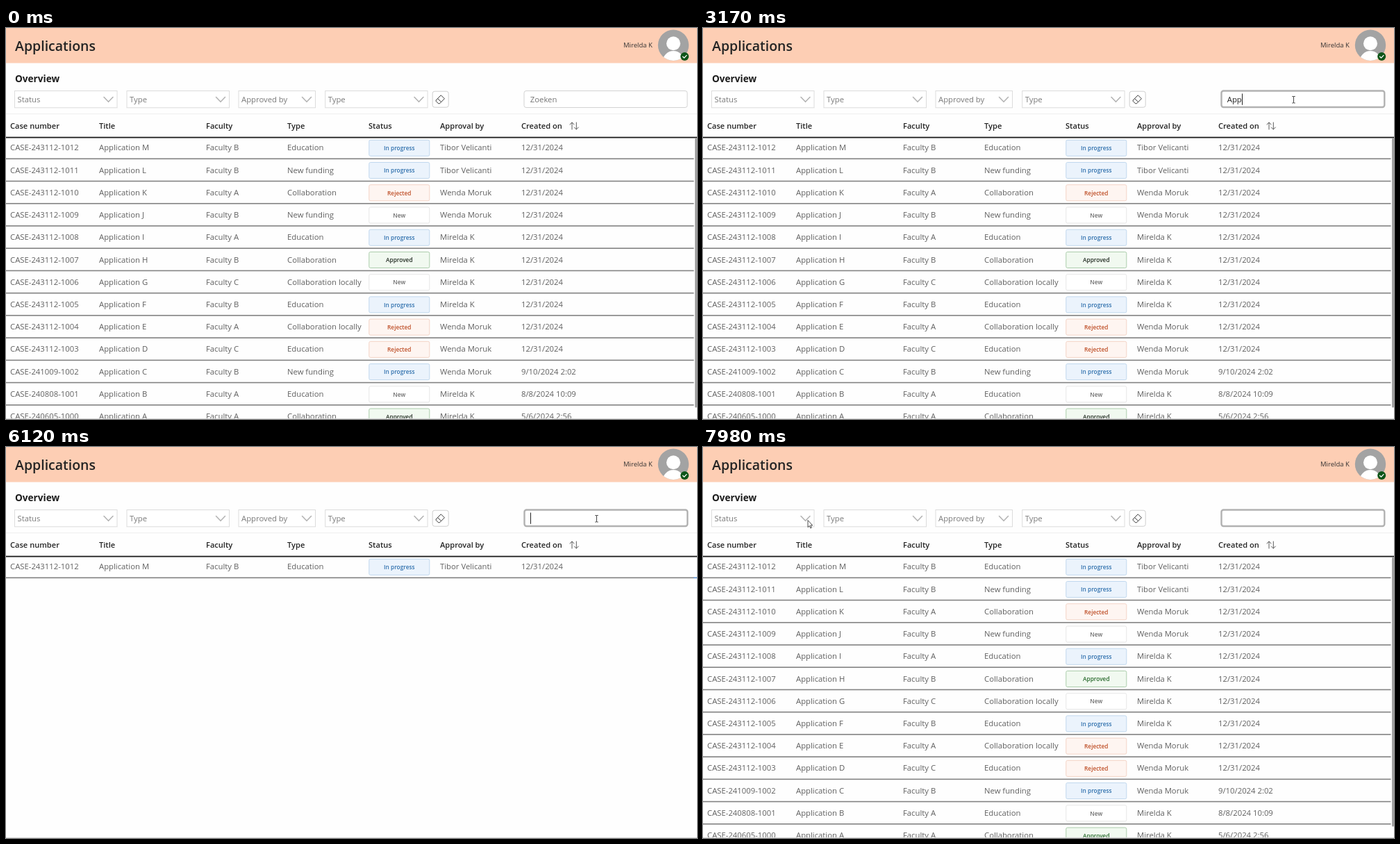
An HTML page for the animation above (8000 ms loop, 995 px wide and 563 px high).

```html
<!DOCTYPE html>
<html lang="en">
<head>
<meta charset="utf-8">
<title>Applications</title>
<style>
  html, body { margin: 0; width: 100%; height: 100%; overflow: hidden; background: #fefefe; }
  svg { display: block; width: 995px; height: 563px; }
  text { font: 11.3px "Open Sans", "Noto Sans", sans-serif; fill: #606060; white-space: pre; }
  .title { font-size: 19.5px; font-weight: 600; fill: #242424; }
  .overview { font-size: 13.6px; font-weight: 700; fill: #1c1c1c; }
  .head { font-size: 11.1px; font-weight: 600; fill: #242424; }
  .user { font-size: 9.5px; fill: #333; }
  .hint { fill: #7a7a7a; }
  .badge { font-size: 8.3px; font-weight: 600; text-anchor: middle; }
  .line { fill: none; stroke-linecap: round; stroke-linejoin: round; }
</style>
</head>
<body>
<svg id="stage" viewBox="0 0 995 563"></svg>
<script>
const LOOP = 8000, PHRASE = 'Application M', SEARCH_X = 754.8;
const ME = 'Mirelda K', TIBOR = 'Tibor Velicanti', WENDA = 'Wenda Moruk';
const COLUMNS = [[6, 'Case number'], [134, 'Title'], [288, 'Faculty'], [405, 'Type'],
  [522, 'Status'], [625, 'Approval by'], [742, 'Created on']];
const EDU = 'Education', FUND = 'New funding', COL = 'Collaboration', LOCAL = 'Collaboration locally';
const BADGES = { // background, border, text
  'In progress': ['#ebf3fc', '#c0d8ee', '#2f70ad'],
  Rejected: ['#fef5f1', '#f3d3c6', '#bf5029'],
  New: ['#ffffff', '#e6e6e6', '#6a6a6a'],
  Approved: ['#f1f9f0', '#abcdab', '#222c22']
};
const NEW_YEAR = '12/31/2024';
const ROWS = [
  ['243112', 'B', EDU, 'In progress', TIBOR],
  ['243112', 'B', FUND, 'In progress', TIBOR],
  ['243112', 'A', COL, 'Rejected', WENDA],
  ['243112', 'B', FUND, 'New', WENDA],
  ['243112', 'A', EDU, 'In progress', ME],
  ['243112', 'B', COL, 'Approved', ME],
  ['243112', 'C', LOCAL, 'New', ME],
  ['243112', 'B', EDU, 'In progress', ME],
  ['243112', 'A', LOCAL, 'Rejected', WENDA],
  ['243112', 'C', EDU, 'Rejected', WENDA],
  ['241009', 'B', FUND, 'In progress', WENDA, '9/10/2024 2:02'],
  ['240808', 'A', EDU, 'New', ME, '8/8/2024 10:09'],
  ['240605', 'A', COL, 'Approved', ME, '5/6/2024 2:56']
];

const text = (x, y, s, cls = '') => `<text x="${x}" y="${y}" class="${cls}">${s}</text>`;
const rect = (x, y, w, h, fill, more = '') =>
  `<rect x="${x}" y="${y}" width="${w}" height="${h}" fill="${fill}" ${more}/>`;
const line = (d, color, width) =>
  `<path class="line" d="${d}" stroke="${color}" stroke-width="${width}"/>`;

function badge(y, status) {
  const [bg, border, ink] = BADGES[status];
  return rect(522.8, y - 11.1, 87, 23, bg, `rx="2" stroke="${border}"`) +
    `<text class="badge ${status}" x="566.3" y="${y + 3.7}" style="fill:${ink}">${status}</text>`;
}

function row([code, faculty, type, status, by, date = NEW_YEAR], i) {
  const y = 172.4 + 32.23 * i;
  const cells = [`CASE-${code}-${1012 - i}`, 'Application ' + 'MLKJIHGFEDCBA'[i],
    'Faculty ' + faculty, type, , by, date];
  return cells.map((s, c) => text(COLUMNS[c][0], y + 4, s)).join('') + badge(y, status) +
    rect(0, y + 15.1, 990.5, 1.6, '#828282');
}

function select(x, w, label) {
  const c = x + w - 12.5;
  return rect(x, 90.5, w, 24.3, '#fff', 'stroke="#dcdcdc"') + text(x + 4, 107.4, label, 'hint') +
    line(`M${c - 6.5} 99.5l6.5 6.8 6.5-6.8`, '#b4b4b4', 1.6);
}

const rows = ROWS.map(row);
document.getElementById('stage').innerHTML = `
  <clipPath id="page"><rect y="158" width="995" height="404"/></clipPath>
  <clipPath id="face"><circle cx="961" cy="24.7" r="22.2"/></clipPath>
  ${rect(0, 0, 995, 563, '#fefefe')}
  ${rect(0, 0, 995, 50.5, '#fdceb4')}
  ${text(13, 32.6, 'Applications', 'title')}
  ${text(889, 28.3, ME, 'user')}
  <g clip-path="url(#face)">
    ${rect(938, 2, 46, 46, '#a3a3a3')}
    <g fill="#fff"><circle cx="961" cy="22.2" r="10"/><ellipse cx="961" cy="48" rx="15.2" ry="15"/></g>
  </g>
  <circle cx="977.2" cy="41" r="6" fill="#0d5518"/>
  ${line('M974.6 41.2l1.9 1.9 3.5-3.7', '#fff', 1.3)}
  ${text(13, 78, 'Overview', 'overview')}
  ${select(12.5, 147.5, 'Status')}${select(174, 147.5, 'Type')}
  ${select(335, 110.5, 'Approved by')}${select(459.7, 147.3, 'Type')}
  ${rect(614.2, 91.2, 23, 23, '#fff', 'rx="3" stroke="#cfcfcf"')}
  ${line('M626.6 97l4.8 4.8-7 7h-1.8l-3.4-3.4v-1zM621.8 101.8l4.9 4.8', '#383838', 1)}
  <rect id="field" y="90.5" fill="#fff" rx="3"/>
  <rect id="mark" x="755" y="94" height="17" fill="#0078d7"/>
  <text id="query" x="${SEARCH_X}" y="107.4"><tspan></tspan><tspan></tspan></text>
  <rect id="caret" y="94.5" width="1" height="16.3" fill="#222"/>
  ${rect(0, 123.2, 995, 1, '#eeeeee')}
  ${COLUMNS.map(([x, s]) => text(x, 145, s, 'head')).join('')}
  ${line('M815 146v-10m-3 3l3-3 3 3M821.3 136v10m-3-3l3 3 3-3', '#5a5a5a', 1)}
  ${rect(0, 156.7, 995, 1.8, '#1c1c1c')}
  <g clip-path="url(#page)">
    ${rows[0]}
    <g id="rest">${rows.slice(1).join('')}${rect(992, 159, 3, 387.5, '#a2a2a2', 'rx="1"')}</g>
    <g id="single">${rect(990, 187.5, 5, 1.6, '#5b8fd0')}</g>
  </g>
  ${rect(0, 562, 995, 1, '#dedede')}
  <g id="beam">${line('M-1.8-4.5h1.4l.4.4.4-.4h1.4M0-4v8.5M-1.8 5h1.4l.4-.4.4.4h1.4', '#333', .9)}</g>
  <path id="arrow" d="M0 0v10l2.3-2 1.5 3.4 1.5-.7-1.5-3.3h3z" fill="#fff" stroke="#222" stroke-width=".8"/>`;

const $ = id => document.getElementById(id);
const [typed, tail] = $('query').children;
const show = (el, on) => { el.style.display = on ? '' : 'none'; };
const set = (el, attrs) => { for (const k in attrs) el.setAttribute(k, attrs[k]); };
const within = (t, spans) => spans.some(([a, b]) => t >= a && t < b);

function typedCount(t) {
  if (t < 2700 || t >= 6120) return 0;
  if (t >= 4300) return 13;
  if (t >= 3370) return Math.min(12, 4 + Math.floor((t - 3370) / 91.25));
  return t < 3040 ? 1 : t < 3170 ? 2 : 3;
}

// Pointer kind and position
function pointer(t) {
  if (t < 1050) return [];
  if (t < 1110) return ['arrow', 911, 137];
  if (t < 1250) return ['arrow', 848, 121];
  if (t < 1450) return ['beam', 850.5, 112 - 3 * Math.floor((t - 1250) / 67)];
  if (t < 7200) return ['beam', 850.5, 103];
  const p = Math.min(1, (Math.floor((t - 7200) / 65) + 1) / 12);
  const e = p * p * (3 - 2 * p);
  return [p < .1 ? 'beam' : 'arrow', 850.5 - 699.5 * e, 103 + 2.5 * e + 4 * 67 * e * (1 - e)];
}

function draw(t) {
  const focus = t >= 1710, selected = t >= 5790 && t < 6120;
  const filtered = t >= 4300 && t < 6380;
  set($('field'), focus
    ? { x: 746.5, width: 234.8, height: 23.5, stroke: '#b2b2b2', 'stroke-width': 2.4 }
    : { x: 746, width: 235, height: 24, stroke: '#d3d3d3', 'stroke-width': 1 });

  const n = typedCount(t);
  typed.textContent = focus ? PHRASE.slice(0, Math.min(n, 12)) : 'Zoeken';
  tail.textContent = n > 12 ? 'M' : '';
  typed.style.fill = selected ? '#fff' : focus ? '#242424' : '#757575';
  tail.style.fill = selected ? '#fff' : '#34618f';
  const width = n ? $('query').getComputedTextLength() : 0;
  set($('mark'), { width });
  show($('mark'), selected);
  set($('caret'), { x: Math.round(755 + width) });
  show($('caret'), within(t, [[1790, 2310], [2700, 4870], [5400, 5790], [6120, 6650], [7180, 7710]]));

  show($('rest'), !filtered);
  show($('single'), filtered);
  document.querySelectorAll('.Approved').forEach(el => {
    el.style.fill = t < 6380 ? BADGES.Approved[2] : '#286a2c';
  });

  const [kind, x, y] = pointer(t);
  for (const id of ['beam', 'arrow']) {
    show($(id), id === kind);
    if (id === kind) set($(id), { transform: `translate(${x} ${y})` });
  }
}

const start = performance.now();
function frame() {
  draw((performance.now() - start) % LOOP);
  requestAnimationFrame(frame);
}
frame();
</script>
</body>
</html>
```
